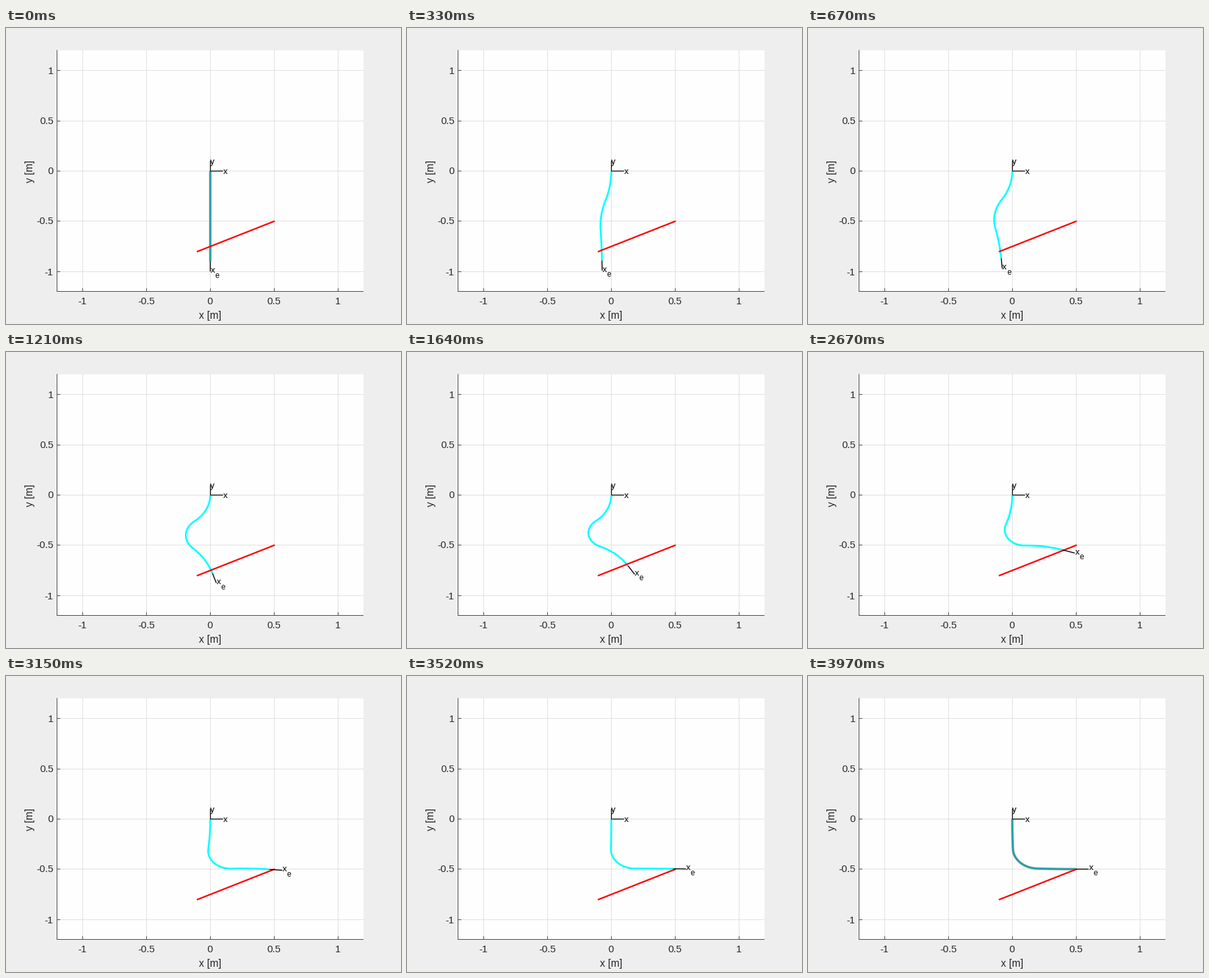
Animation of 600x450 px, one loop 4000 ms. Source, as a matplotlib script:

```python
import numpy as np
import matplotlib
import matplotlib.pyplot as plt
from matplotlib.animation import FuncAnimation

matplotlib.rcParams["font.family"] = "Liberation Sans"
matplotlib.rcParams["toolbar"] = "None"

W, H, DPI = 600, 450, 100
FRAMES, INTERVAL = 100, 40
SEG = 0.3      # length of one arm section
HAND = 0.1     # length of the frame axes
INK = "#262626"
CYAN, TEAL = "#00ffff", "#22a1a7"

# Bending angle of the three sections (degrees) at a few moments
KEY_T = np.array([0, 16, 30, 42, 52, 66, 78, 88, 99], float)
KEY_Q = np.array([
    [0, 0, 0],
    [-32.5, 45.5, -8.5],
    [-51.2, 96.9, -28.2],
    [-50.5, 118.5, -35],
    [-40, 120.5, -30.5],
    [-19.5, 110.5, -19],
    [-6, 98, -7],
    [-1, 91, -1],
    [2, 86, 2],
])
SLOPE = np.gradient(KEY_Q, KEY_T, axis=0, edge_order=2)
SLOPE[-1] = 0


def pt(px):
    return px * 72 / DPI


def sx(x):
    return 310.3 + 193.8 * np.asarray(x)


def sy(y):
    return 217.5 - 152.8 * np.asarray(y)


def crisp(v):
    """Centre of the pixel that holds v."""
    return float(np.floor(v)) + 0.5


def bend(t):
    """Smooth section angles in radians at time t."""
    i = min(np.searchsorted(KEY_T, t, side="right") - 1, len(KEY_T) - 2)
    h = KEY_T[i + 1] - KEY_T[i]
    u = (t - KEY_T[i]) / h
    q = ((1 + 2 * u) * (1 - u) ** 2 * KEY_Q[i]
         + u * (1 - u) ** 2 * h * SLOPE[i]
         + u * u * (3 - 2 * u) * KEY_Q[i + 1]
         + u * u * (u - 1) * h * SLOPE[i + 1])
    return np.radians(q)


def arm(q, n=40):
    """Points of the arm and its final heading, measured from straight down."""
    mid = (np.arange(n) + 0.5) / n
    start = np.concatenate([[0], np.cumsum(q)[:-1]])
    heading = (start[:, None] + q[:, None] * mid).ravel()
    step = SEG / n
    x = np.concatenate([[0], np.cumsum(np.sin(heading)) * step])
    y = np.concatenate([[0], -np.cumsum(np.cos(heading)) * step])
    return x, y, q.sum()


fig = plt.figure(figsize=(W / DPI, H / DPI), dpi=DPI, facecolor="#efeeef")
ax = fig.add_axes([0, 0, 1, 1])
ax.set_xlim(0, W)
ax.set_ylim(H, 0)
ax.axis("off")


def line(xs, ys, color, width, z, cap="butt"):
    return ax.plot(xs, ys, color=color, lw=pt(width), zorder=z, snap=False,
                   solid_capstyle=cap, solid_joinstyle="round")[0]


def label(x, y, s, size, ha="center", va="center", color=INK, **kw):
    return ax.text(x, y, s, fontsize=pt(size), ha=ha, va=va, color=color,
                   zorder=8, **kw)


# Plot area, grid, ticks
L, R, T, B = 77.5, 543, 33.5, 400.5
ax.add_patch(plt.Rectangle((L, T), R - L, B - T, fc="#fefefe", ec="none", zorder=0))
for v in (-1, -0.5, 0, 0.5, 1):
    gx, gy = crisp(sx(v)), crisp(sy(v))
    line([gx, gx], [T, B], "#e0e0e0", 1, 1)
    line([L, R], [gy, gy], "#e0e0e0", 1, 1)
    line([gx, gx], [B - 5, B], "#4a4a4a", 1, 2)
    line([L, L + 5], [gy, gy], "#4a4a4a", 1, 2)
    label(gx - 0.5, 416.5, f"{v:g}", 15)
    label(72, gy + 1, f"{v:g}", 15, ha="right")
line([L, L], [T, B], "#4a4a4a", 1, 2)
line([L - 0.5, R], [B, B], "#4a4a4a", 1, 2)
label(310, 437.5, "x [m]", 15.8)
label(36, 217.5, "y [m]", 15.8, rotation=90)

# Base frame
ox, oy = crisp(sx(0)), crisp(sy(0))
line([ox, sx(HAND)], [oy, oy], "black", 1.3, 6)
line([ox, ox], [oy, sy(HAND)], "black", 1.3, 6)
label(sx(HAND) + 0.2, oy + 4.7, "x", 13.4, "left", "baseline", "black")
label(ox - 0.1, sy(HAND) + 4.5, "y", 13.4, "left", "baseline", "black")

# Path to follow
line(sx([-0.1, 0.5]), sy([-0.8, -0.5]), "#ff0000", 2.3, 5, "projecting")

# Moving parts
halo = line([], [], "#b3ada0", 3.9, 3)
body = line([], [], CYAN, 2.7, 4)
hand = line([], [], "black", 1.4, 6)
tip_x = label(0, 0, "x", 13.4, "left", "baseline", "black")
tip_e = label(0, 0, "e", 11.6, "left", "baseline", "black")


def draw(n):
    x, y, a = arm(bend(n))
    px, py = sx(x), sy(y)
    body.set_data(px, py)
    halo.set_data(px, py)
    resting = n in (0, FRAMES - 1)
    body.set_color(TEAL if resting else CYAN)
    halo.set_visible(resting)
    ex = float(sx(x[-1] + HAND * np.sin(a)))
    ey = float(sy(y[-1] - HAND * np.cos(a)))
    hand.set_data([px[-1], ex], [py[-1], ey])
    tip_x.set_position((ex + 0.3, ey + 1.9))
    tip_e.set_position((ex + 7, ey + 9.4))
    return halo, body, hand, tip_x, tip_e


anim = FuncAnimation(fig, draw, frames=FRAMES, interval=INTERVAL,
                     init_func=lambda: draw(0), repeat=True, repeat_delay=0)
plt.show()
```
